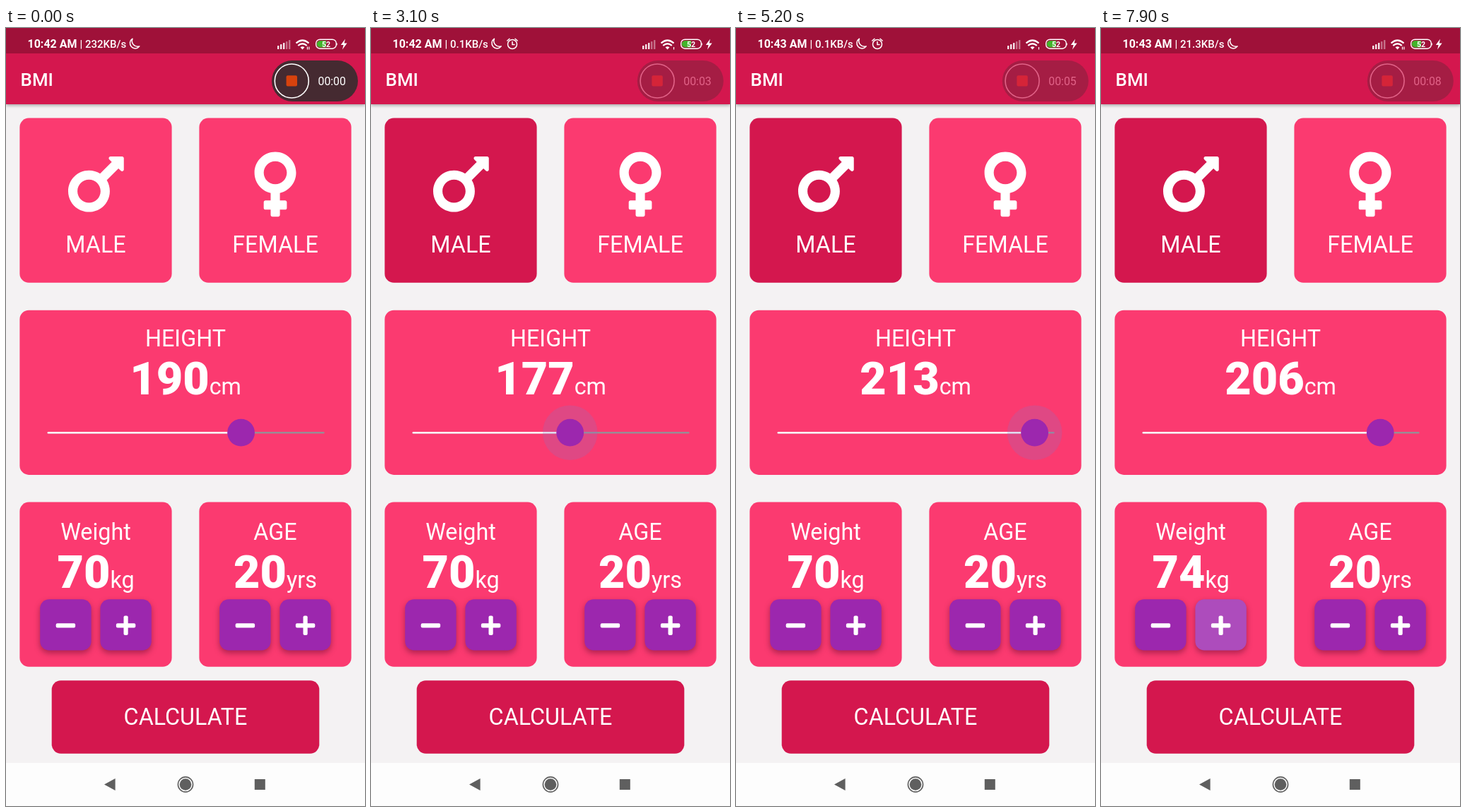
Animation, 508 px wide and 1102 px high, one loop 8 s. Source, as an HTML page:

```html
<!DOCTYPE html>
<html lang="en">
<head>
<meta charset="utf-8">
<title>BMI</title>
<style>
  html, body { margin: 0; width: 100%; height: 100%; overflow: hidden; background: #f4f2f3; }
  svg { display: block; width: 100vw; height: 100vh; font-family: Roboto, sans-serif; }
  text { fill: #fff; white-space: pre; }
  .mid { text-anchor: middle; font-size: 32.3px; }
  .num { font-size: 64.7px; font-weight: 900; }
  .card { fill: #fb3a70; }
  .dark { fill: #d4174e; }
  .button { fill: #9c27ae; filter: drop-shadow(0 4px 4px rgba(70, 0, 30, .42)); }
  .bar { filter: drop-shadow(0 2px 2px rgba(0, 0, 0, .3)); }
</style>
</head>
<body>
<svg id="stage" viewBox="0 0 508 1102"></svg>
<script>
const LOOP = 8000, STEP = 100;
const stage = document.getElementById('stage');

const box = (x, y, w, h, r, attrs = '') =>
  `<rect x="${x}" y="${y}" width="${w}" height="${h}" rx="${r}" ${attrs}/>`;
const card = (x, y, w, h = 233.2, attrs = 'class="card"') => box(x, y, w, h, 12.9, attrs);
const label = (x, y, text) => `<text class="mid" x="${x}" y="${y}">${text}</text>`;
const amount = (x, y, id, unit) =>
  `<text class="mid" x="${x}" y="${y}"><tspan class="num" id="${id}"></tspan>${unit}</text>`;

const button = (cx, plus) =>
  box(cx - 36.2, 809.2, 72.4, 72.4, 12.9, 'class="button"') +
  box(cx - 13.7, 843.2, 27.4, 6.2, 2, 'fill="#fff"') +
  (plus ? box(cx - 3.1, 832.6, 6.2, 27.4, 2, 'fill="#fff"') : '');

const counter = (cx, title, id, unit) =>
  card(cx - 107.6, 671.6, 215.2) + label(cx, 725, title) + amount(cx, 793, id, unit) +
  button(cx - 42.6, false) + button(cx + 42.6, true);

const MARS = 'M372 64h-79c-10.7 0-16 12.9-8.5 20.5l16.9 16.9-80.7 80.7C198.5 167.6 172.2 160 144 160 64.5 160 0 224.5 0 304s64.5 144 144 144 144-64.5 144-144c0-28.2-7.6-54.5-21-77.2l80.7-80.7 16.9 16.9c7.6 7.6 20.5 2.2 20.5-8.5V76c0-6.6-5.4-12-12-12zM144 384c-44.1 0-80-35.9-80-80s35.9-80 80-80 80 35.9 80 80-35.9 80-80 80z';
const VENUS = 'M288 176c0-79.5-64.5-144-144-144S0 96.5 0 176c0 68.5 47.9 125.9 112 140.4V368H76c-6.6 0-12 5.4-12 12v40c0 6.6 5.4 12 12 12h36v36c0 6.6 5.4 12 12 12h40c6.6 0 12-5.4 12-12v-36h36c6.6 0 12-5.4 12-12v-40c0-6.6-5.4-12-12-12h-36v-51.6c64.1-14.6 112-71.9 112-140.4zm-224 0c0-44.1 35.9-80 80-80s80 35.9 80 80-35.9 80-80 80-80-35.9-80-80z';
const icon = (x, path) =>
  `<path transform="translate(${x} 169) scale(.2045)" fill="#fff" d="${path}"/>`;

const signal = [5, 7, 9, 11, 13].map((h, i) =>
  box(384 + i * 4, 30 - h, 2.4, h, .6, `fill="#fff" opacity="${i < 3 ? .9 : .4}"`)).join('');

const statusBar = `
  <rect width="508" height="36" fill="#9f1139"/>
  <text id="clock" x="30.5" y="28" font-size="16" font-weight="700"></text>
  <text id="speed" x="104.5" y="28" font-size="15" font-weight="500"></text>
  <path id="moon" fill="none" stroke="#fff" stroke-width="1.5" stroke-linejoin="round"
    d="M-2.5-7.3A7.4 7.4 0 1 0 7.3 3.4 8 8 0 0 1-2.5-7.3z"/>
  <g id="alarm" fill="none" stroke="#fff" stroke-width="1.5" stroke-linecap="round">
    <circle cx="200" cy="23" r="6.5"/>
    <path d="M200 19.5V23.5H203M192.8 18L196 15.2M207.2 18L204 15.2"/>
  </g>
  ${signal}
  <g fill="none" stroke="#fff" stroke-width="2.2">
    <path d="M410.5 21.5Q419.5 13.5 428.5 21.5M413.3 25Q419.5 19.5 425.7 25"/>
    <path d="M416.5 27.3Q419.5 25 422.5 27.3L419.5 30.5Z" fill="#fff" stroke="none"/>
    <path id="traffic" stroke-width="1.2"/>
  </g>
  ${box(438.7, 16.2, 28.6, 13, 5.5, 'fill="none" stroke="#fff" stroke-width="1.4"')}
  <path d="M453 18H444.5A4.7 4.7 0 0 0 444.5 27.4H453Z" fill="#42b52b"/>
  <path d="M468.3 20.5Q470 22.7 468.3 25" fill="#fff"/>
  <text x="453" y="26.6" font-size="10.5" font-weight="700" text-anchor="middle">52</text>
  <path d="M480 15.5L473.8 24H477.6L476 30.5L482.6 21.5H478.6Z" fill="#fff"/>`;

const recorder = `
  <g id="recorder">
    ${box(376, 46, 122, 58, 29, 'fill="#452a31"')}
    <circle cx="404.3" cy="75" r="24" fill="none" stroke="#fff" stroke-width="1.6"/>
    ${box(396.6, 67.2, 15.4, 15.4, 2, 'fill="#d8420d"')}
    <text id="timer" x="441.5" y="80.5" font-size="15.8"></text>
  </g>`;

const slider = `
  ${box(58.6, 571.9, 392, 2.6, 1.3, 'fill="#9a8c95"')}
  ${box(58.6, 571.9, 0, 2.6, 1.3, 'id="track" fill="#fff"')}
  <circle id="halo" cy="573.2" fill="#8c70c0" fill-opacity=".25"/>
  <circle id="thumb" cy="573.2" r="19.4" fill="#9c27ae"/>`;

const ripple = `
  <clipPath id="plusClip">${box(133.4, 809.2, 72.4, 72.4, 12.9)}</clipPath>
  <g id="ripple" clip-path="url(#plusClip)" fill="#fff">
    <rect id="glow" x="133" y="809" width="73" height="73"/>
    <circle id="splash" cx="193" cy="837"/>
  </g>`;

const navBar = `
  <rect y="1041" width="508" height="61" fill="#fdfdfd"/>
  <g fill="#5f5f5f">
    <path d="M139 1071.5L154.6 1063V1080Z"/>
    <circle cx="254" cy="1071.5" r="8.3"/>
    <circle cx="254" cy="1071.5" r="10.6" fill="none" stroke="#5f5f5f" stroke-width="1.6"/>
    <rect x="351.8" y="1064" width="15" height="15"/>
  </g>`;

stage.innerHTML =
  '<rect width="508" height="1102" fill="#f4f2f3"/>' +
  '<rect class="dark bar" width="508" height="108"/>' + statusBar +
  '<text x="20.6" y="82" font-size="25.9" font-weight="500">BMI</text>' + recorder +
  card(19.4, 127.6, 215.2, 233.2, 'id="male"') + icon(88, MARS) + label(127, 317.5, 'MALE') +
  card(273.4, 127.6, 215.2) + icon(351.6, VENUS) + label(381, 317.5, 'FEMALE') +
  card(19.4, 399.7, 469.2) + label(254, 451, 'HEIGHT') + amount(254, 519, 'height', 'cm') + slider +
  counter(127, 'Weight', 'weight', 'kg') + counter(381, 'AGE', 'age', 'yrs') + ripple +
  card(64.7, 924.2, 378.6, 103.5, 'class="dark"') + label(254, 987.3, 'CALCULATE') + navBar;

const $ = id => document.getElementById(id);
const set = (id, attrs) => {
  for (const name in attrs) $(id).setAttribute(name, attrs[name]);
};
const write = (id, text) => { $(id).textContent = text; };
const clamp = v => Math.max(0, Math.min(1, v));

// Drag of the height slider: [time, centimetres]
const DRAG = [[2200, 190], [3100, 177], [4300, 206], [4800, 209], [4900, 211],
  [5300, 214], [5700, 214], [5800, 213], [6000, 213], [6200, 212], [6700, 206]];
const TAPS = [7200, 7400, 7700, 7900];

function heightAt(t) {
  const i = DRAG.findIndex(([time]) => time > t);
  if (i === 0) return DRAG[0][1];
  if (i < 0) return DRAG[DRAG.length - 1][1];
  const [t0, a] = DRAG[i - 1], [t1, b] = DRAG[i];
  return Math.round(a + (b - a) * (t - t0) / (t1 - t0));
}

function drawStatus(t) {
  const [speed, moonX] = t < 1300 ? ['232', 181.5] : t < 5300 ? ['0.1', 177] : ['21.3', 185.8];
  const quiet = speed === '0.1';
  write('clock', t < 3700 ? '10:42 AM' : '10:43 AM');
  write('speed', `| ${speed}KB/s`);
  set('moon', { transform: `translate(${moonX} 22.5)` });
  set('alarm', { opacity: quiet ? 1 : 0 });
  set('traffic', { d: quiet ? 'M428.5 27V30.5' : 'M426.5 26.5V30.5M428.9 26.5V30.5' });
}

function drawRecorder(t) {
  write('timer', '00:0' + Math.floor((t + 200) / 1000));
  set('recorder', t < 100 ? { opacity: 1, transform: '' }
    : { opacity: .32, transform: 'translate(.8 0)' });
}

function drawSlider(t) {
  const value = heightAt(t), x = 58.6 + (value - 120) * 3.914;
  write('height', value);
  set('track', { width: x - 58.6 });
  set('thumb', { cx: x });
  set('halo', { cx: x, r: 38.8 * Math.min(clamp((t - 2100) / 200), clamp((6800 - t) / 200)) });
}

function drawTaps(t) {
  const age = t - TAPS[0];
  write('weight', 70 + TAPS.filter(tap => tap <= t).length);
  set('ripple', { opacity: age < 0 ? 0 : 1 });
  set('glow', { opacity: .06 + .06 * clamp(age / 300) });
  set('splash', { r: 2.8 + .13 * Math.max(0, age), opacity: .3 - .24 * clamp(age / 400) });
}

function draw(now) {
  const t = Math.floor(now % LOOP / STEP) * STEP;
  drawStatus(t);
  drawRecorder(t);
  set('male', { class: t < 1300 ? 'card' : 'dark' });
  drawSlider(t);
  drawTaps(t);
  requestAnimationFrame(draw);
}

write('age', 20);
draw(0);
</script>
</body>
</html>
```
